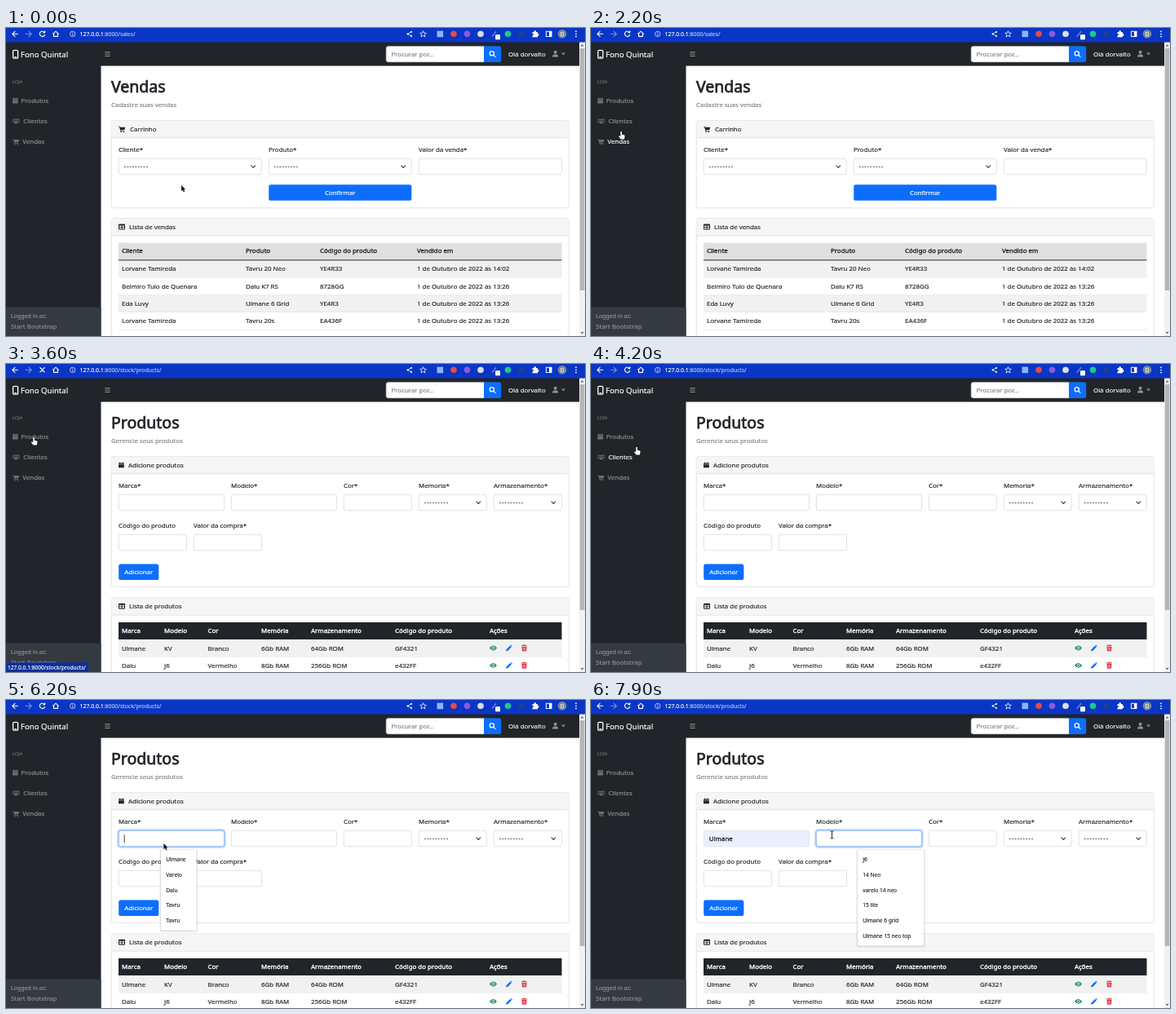
Recreate the animation shown at these times as an HTML page. Size 710 by 378 pixels, loop 8000 ms.

```html
<!DOCTYPE html>
<html lang="pt-BR">
<head>
<meta charset="utf-8">
<title>Vendas</title>
<style>
html, body { margin: 0; width: 100%; height: 100%; overflow: hidden; background: #fff; }
svg { display: block; width: 710px; height: 378px; font: 7.9px "Noto Sans", "Open Sans", sans-serif; color: #212529; fill: currentColor; }
/* The thin stroke gives the text a medium weight */
text { white-space: pre; stroke: currentColor; stroke-width: .16; }
.m { stroke-width: .34; }
.h1 { font-size: 19.5px; stroke-width: .75; }
.mute { color: #7b8288; }
.w { color: #fff; }
.line { fill: none; stroke: #fff; stroke-width: 1.1; stroke-linecap: round; stroke-linejoin: round; }
.link { color: #909294; }
.link.on { color: #fff; }
.dim { color: #6c6f72; }
.pop { font-size: 6.6px; }
</style>
</head>
<body>
<svg id="stage" viewBox="0 0 710 378" xmlns="http://www.w3.org/2000/svg"></svg>
<script>
const LOOP = 8000, TICK = 100, BLUE = '#0d6efd', DARK = '#212529', BAR = '#0a36c6';

const text = (x, y, s, attr = '') => `<text x="${x}" y="${y}" ${attr}>${s}</text>`;
const rect = (x, y, w, h, fill, attr = '') =>
  `<rect x="${x}" y="${y}" width="${w}" height="${h}" fill="${fill}" ${attr}/>`;
const dot = (x, y, r, fill, attr = '') => `<circle cx="${x}" cy="${y}" r="${r}" fill="${fill}" ${attr}/>`;
const path = (d, attr = '') => `<path d="${d}" ${attr}/>`;
const at = (x, y, body, attr = '') => `<g transform="translate(${x} ${y})" ${attr}>${body}</g>`;
const group = (id, body) => `<g id="${id}">${body}</g>`;

// Icons, drawn from their top left corner
const icon = {
  cart: path('M0 .3H1.6L2 1.4H8.2L7.3 4.6H2.8L3 5.4H7V6.1H2.3L1.1 1H0Z') + '<circle cx="3.1" cy="7" r=".8"/><circle cx="6.6" cy="7" r=".8"/>',
  box: path('M1.2 0H2.2V1H4.6V0H5.6V1H6.8V2.3H0V1H1.2ZM0 2.8H6.8V6.8H0Z'),
  users: '<circle cx="4.5" cy="2.2" r="1.3"/><circle cx="1.6" cy="1.6" r="1"/><circle cx="7.4" cy="1.6" r="1"/>' +
    path('M2.2 6.6Q2.2 4 4.5 4T6.8 6.6ZM0 4.9Q0 3 1.7 3L2.6 3.5 1.8 4.9ZM9 4.9Q9 3 7.3 3L6.4 3.5 7.2 4.9Z'),
  table: path('M1 0H7Q8 0 8 1V6Q8 7 7 7H1Q0 7 0 6V1Q0 0 1 0ZM1 2V3.6H3.5V2ZM4.5 2V3.6H7V2ZM1 4.5V6H3.5V4.5ZM4.5 4.5V6H7V4.5Z', 'fill-rule="evenodd"'),
  user: '<circle cx="3.6" cy="2" r="2"/>' + path('M0 7.6Q0 4.6 2.5 4.6H4.7Q7.2 4.6 7.2 7.6Z'),
  eye: path('M0 3Q4.5 -3 9 3Q4.5 9 0 3Z') + dot(4.5, 3, 2, '#fff') + '<circle cx="4.5" cy="3" r="1.2"/>',
  pencil: path('M0 8L.6 5.7 5.2 1.1 6.9 2.8 2.3 7.4ZM5.7 .6L6.3 0 8 1.7 7.4 2.3Z'),
  trash: path('M0 .7H2L2.5 0H4.5L5 .7H7V1.6H0ZM.5 2.2H6.5L6.1 8H.9Z') + path('M2.3 3.3V7M3.5 3.3V7M4.7 3.3V7', 'stroke="#fff" stroke-width=".4"'),
};

function field(x, w, y = 160, select = false) {
  let s = rect(x + .25, y + .25, w - .5, 19.5, '#fff', 'rx="2.6" stroke="#ced4da" stroke-width=".7"');
  if (select) s += text(x + 6.5, y + 12.4, '---------', 'letter-spacing=".85"') +
    path(`M${x + w - 13} ${y + 8.7}l2.7 2.7 2.7 -2.7`, 'fill="none" stroke="#343a40" stroke-width="1.1"');
  return s;
}
const button = (x, y, w, label) => rect(x + .2, y + .3, w - .4, 19.5, BLUE, 'rx="2.6"') +
  text(x + w / 2, y + 12.7, label, 'class="w" text-anchor="middle"');

function card(y, h, pic, tx, title) {
  return rect(129.3, y, 560.8, h, '#fff', 'rx="2.8" stroke="#d9d9d9" stroke-width=".7"') +
    path(`M129.6 ${y + 21.3}V${y + 3}q0 -2.6 2.6 -2.6H687.2q2.6 0 2.6 2.6V${y + 21.3}Z`, 'fill="#f6f6f6"') +
    rect(129.3, y + 21, 560.8, .7, '#d9d9d9') +
    at(138, y + 7, icon[pic]) + text(tx, y + 13.4, title);
}
const heading = (title, sub) => text(129, 78.5, title, 'class="h1"') + text(129, 97, sub, 'class="mute"');
const cells = (xs, y, items, attr) => items.map((s, i) => text(xs[i], y, s, attr)).join('');

function salesPage() {
  const xs = [142, 294, 385, 504], day = '1 de Outubro de 2022 às ';
  const rows = [
    ['Lorvane Tamireda', 'Tavru 20 Neo', 'YE4R33', day + '14:02'],
    ['Belmiro Tulo de Quenara', 'Dalu K7 RS', '8728GG', day + '13:26'],
    ['Eda Luvy', 'Ulmane 6 Grid', 'YE4R3', day + '13:26'],
    ['Lorvane Tamireda', 'Tavru 20s', 'EA436F', day + '13:26'],
  ];
  return heading('Vendas', 'Cadastre suas vendas') +
    card(113.4, 107.4, 'cart', 152, 'Carrinho') +
    cells([138, 322, 506], 152.2, ['Cliente*', 'Produto*', 'Valor da venda*']) +
    field(138, 175.5, 160, true) + field(322, 175.5, 160, true) + field(506, 175.5) +
    button(322, 192, 175.5, 'Confirmar') +
    card(233.6, 170, 'table', 151, 'Lista de vendas') +
    rect(138, 263.7, 543.5, 20.8, '#e0e0e0') +
    cells(xs, 276.4, ['Cliente', 'Produto', 'Código do produto', 'Vendido em'], 'class="m"') +
    rows.map((r, i) => {
      const y = 285 + i * 21.3;
      return rect(138, y, 543.5, 21.3, i % 2 ? '#fff' : '#f1f1f1') +
        rect(138, y + 20.9, 543.5, .6, '#d9dcdf') + cells(xs, y + 13.4, r);
    }).join('') + rect(138, 284.4, 543.5, 1, DARK);
}

function productsPage() {
  const xs = [142, 194, 247.5, 313, 374, 477, 593];
  const rows = [
    ['Ulmane', 'KV', 'Branco', '6Gb RAM', '64Gb ROM', 'GF4321'],
    ['Dalu', 'J6', 'Vermelho', '8Gb RAM', '256Gb ROM', 'e432FF'],
  ];
  return heading('Produtos', 'Gerencie seus produtos') +
    card(113.4, 160, 'box', 150, 'Adicione produtos') +
    cells([138, 276, 414, 506, 598], 152.2, ['Marca*', 'Modelo*', 'Cor*', 'Memoria*', 'Armazenamento*']) +
    field(138, 129.8) + field(276, 129.8) + field(414, 83.6) + field(506, 83.6, 160, true) + field(598, 83.6, 160, true) +
    cells([138, 230], 201.2, ['Código do produto', 'Valor da compra*']) +
    field(138, 83.8, 209) + field(230, 83.8, 209) +
    button(138, 245.3, 49.5, 'Adicionar') +
    card(286.8, 120, 'table', 151, 'Lista de produtos') +
    rect(138, 317, 543.5, 21.2, DARK) +
    cells(xs, 330, ['Marca', 'Modelo', 'Cor', 'Memória', 'Armazenamento', 'Código do produto', 'Ações'], 'class="w m"') +
    rows.map((r, i) => {
      const y = 338.2 + i * 21.3;
      return rect(138, y, 543.5, 21.3, i % 2 ? '#fff' : '#f1f1f1') + rect(138, y + 20.9, 543.5, .6, '#d9dcdf') +
        cells(xs, y + 13.4, r) + at(593, y + 7.4, icon.eye, 'fill="#198754"') +
        at(613, y + 6.3, icon.pencil, `fill="${BLUE}"`) + at(632, y + 6.3, icon.trash, 'fill="#dc3545"');
    }).join('');
}

function browserBar() {
  const tools = [
    [549, '#e5484d'], [565.5, '#8a5be0'], [582, '#d9dde3'], [615.5, '#22c98a'], [632, '#1c3f9e'],
  ];
  return rect(0, 0, 710, 17.5, BAR) +
    path('M14.5 7.3H8M11 4.2L7.8 7.3 11 10.4', 'class="line"') +
    path('M24.5 7.3H31M28 4.2L31.2 7.3 28 10.4', 'class="line" opacity=".45"') +
    group('reload', path('M47.2 5.3A3.2 3.2 0 1 0 47.6 8.3M47.7 3.7V5.7H45.6', 'class="line"')) +
    group('stop', path('M41.8 4.5L47.2 9.9M47.2 4.5L41.8 9.9', 'class="line"')) +
    path('M57.6 7.2L61 4.1 64.4 7.2M58.6 6.8V10.4H63.4V6.8', 'class="line"') +
    dot(81.7, 7.3, 3.2, 'none', 'stroke="#dbe5ff" stroke-width=".8"') + rect(81.3, 6.8, .9, 2.4, '#dbe5ff') + rect(81.3, 5.3, .9, .9, '#dbe5ff') +
    '<text x="90.5" y="10" font-size="6.9" class="w">127.0.0.1<tspan color="#b4c6f5">:8000<tspan id="path"></tspan></tspan></text>' +
    path('M492.6 7.3L497 4.8M492.6 7.3L497 9.8', 'stroke="#fff" stroke-width=".8"') +
    dot(492.6, 7.3, 1.1, '#fff') + dot(497, 4.8, 1.1, '#fff') + dot(497, 9.8, 1.1, '#fff') +
    path('M511.5 3.6l1.1 2.5 2.7 .2-2.1 1.8.7 2.7-2.4-1.5-2.4 1.5.7-2.7-2.1-1.8 2.7-.2Z', 'fill="none" stroke="#fff" stroke-width=".8"') +
    rect(528.5, 3.5, 7.6, 7.6, '#8db4f5') + tools.map(([x, c]) => dot(x, 7.3, 3.8, c)).join('') +
    path('M596 10.5L601 4', 'stroke="#5b7fe0" stroke-width="1.6"') + rect(600, 8, 6, 6.2, '#f2f5ff', 'rx="1"') +
    path('M645.5 5H647.5Q647.2 3 648.7 3T650 5H652V7Q653.5 6.8 653.5 8.2T652 9.4V11.2H645.5V9.2Q647 9 647 8T645.5 7Z', 'class="w"') +
    rect(662.4, 4.2, 6.6, 6.2, 'none', 'stroke="#fff"') + rect(666, 4.2, 3, 6.2, '#fff') +
    dot(682, 7.3, 5.3, '#7d8b93') + text(682, 9.7, 'D', 'class="w" font-size="6.4" text-anchor="middle"') +
    [4.2, 7.3, 10.4].map(y => dot(699, y, .9, '#fff')).join('');
}

const LINKS = [['Produtos', 'box', 18.5, 92], ['Clientes', 'users', 21.3, 117], ['Vendas', 'cart', 20.3, 142]];

function frame() {
  return rect(0, 17, 703, 29.5, DARK) + rect(0, 46, 116.5, 332, DARK) + rect(0, 342.8, 116.5, 36, '#343a40') +
    rect(8.6, 27.4, 6, 9.8, 'none', 'rx="1.2" stroke="#fff" stroke-width="1.3"') + rect(10.3, 35, 2.6, 1.1, '#fff') +
    text(18, 35.6, 'Fono Quintal', 'class="w" font-size="9.6"') +
    path('M121.3 29.6H127.7M121.3 32H127.7M121.3 34.4H127.7', 'stroke="#8e9194" stroke-width="1"') +
    rect(466.2, 22.4, 122, 19.3, '#fff', 'rx="2.6" stroke="#ced4da" stroke-width=".6"') +
    text(472.5, 34.8, 'Procurar por...', 'class="mute"') +
    path('M586 22.3H604.6Q607.2 22.3 607.2 25V39.3Q607.2 42 604.6 42H586Z', `fill="${BLUE}"`) +
    dot(595.8, 31.2, 2.6, 'none', 'stroke="#fff" stroke-width="1.3"') + path('M597.8 33.2L600 35.4', 'class="line"') +
    text(616, 34.8, 'Olá dorvalto', 'color="#f2f2f3"') + at(670, 27.8, icon.user, 'fill="#909294"') +
    path('M681 30.6H686L683.5 33.2Z', 'fill="#909294"') +
    text(8, 68, 'LOJA', 'class="dim" font-size="5.6"') +
    LINKS.map(([name, pic, x, y], i) => at(8, y - 6.4, icon[pic], 'class="dim"') + text(x, y, name, `class="link" id="link${i}"`)).join('') +
    text(6, 356.3, 'Logged in as:', 'class="link" font-size="7"') + text(6, 368.6, 'Start Bootstrap', 'class="link"') +
    rect(703, 17.2, 7, 361, '#f1f1f1') + path('M704.6 22.4H708.6L706.6 20ZM704.6 373H708.6L706.6 375.4Z', 'fill="#6a6a6a"') +
    '<rect id="thumb" x="703.8" y="25" width="5.6" fill="#b5b5b5"/>';
}

function popup(id, x, w, items) {
  const h = items.length * 18.7 + 5.2;
  return group(id, [1.6, .8].map(d => rect(x - d, 184 - d / 2, w + 2 * d, h + 2 * d, '#000', 'rx="2" opacity=".07"')).join('') +
    rect(x, 184, w, h, '#fff', 'rx="1.5"') +
    rect(x, 186.6, w, 18.7, '#e8e8e8', 'class="hover" visibility="hidden"') +
    items.map((s, i) => text(x + 6.3, 198.2 + i * 18.7, s, 'class="pop"')).join(''));
}
const focusRing = (id, x) => group(id,
  rect(x - .8, 159.2, 131.4, 21.6, 'none', 'rx="3.4" stroke="#0d6efd" stroke-opacity=".27" stroke-width="2.1"') +
  rect(x + .25, 160.25, 129.3, 19.5, 'none', 'rx="2.6" stroke="#86b7fe" stroke-width=".8"'));
const caret = (id, x) => rect(x, 165.4, .8, 10, '#111', `id="${id}"`);

const outline = 'paint-order="stroke" stroke-linejoin="round" stroke-width=".9"';
const pointers = {
  arrow: path('M0 0V7.3L1.7 5.8 2.9 8.5 4.2 7.9 3 5.3H5.2Z', `fill="#111" stroke="#fff" ${outline}`),
  hand: path('M-.8 .2Q0 -.6 .8 .2V3.6L4 4.4Q4.6 4.8 4.5 5.8L3.8 9.6H-.6L-3 6.2Q-3 5 -1.8 5.4L-.8 6.2Z', `fill="#fff" stroke="#111" ${outline}`),
  beam: path('M-1.9 -4.4H-.4L0 -4 .4 -4.4H1.9M0 -4V4M-1.9 4.4H-.4L0 4 .4 4.4H1.9', 'fill="none" stroke="#111" stroke-width=".9"'),
};

document.getElementById('stage').innerHTML =
  rect(0, 0, 710, 378, '#fff') + frame() + browserBar() +
  group('sales', salesPage()) +
  group('products', productsPage() +
    group('filled', rect(138.6, 160.6, 128.6, 18.8, '#e8f0fe', 'rx="2.3"') + text(144.8, 172.5, 'Ulmane', 'class="m"')) +
    focusRing('ring1', 138) + focusRing('ring2', 276) +
    caret('caret1', 144.7) + caret('caret2', 173.6) + caret('caret3', 282.6) +
    popup('pop1', 190, 43.5, ['Ulmane', 'Varelo', 'Dalu', 'Tavru', 'Tavru']) +
    popup('pop2', 327, 81.2, ['J6', '14 Neo', 'varelo 14 neo', '15 lite', 'Ulmane 6 grid', 'Ulmane 15 neo top'])) +
  group('status', rect(0, 366.4, 101, 12, '#0a2f9e') + text(2, 374.7, '127.0.0.1:8000/stock/products/', 'class="w" font-size="6.6"')) +
  group('cursor', Object.entries(pointers).map(([k, s]) => group(k, s)).join(''));

// Pointer track: time, x, y
const TRACK = [
  [0, 215, 193], [900, 215, 193], [1200, 196, 187], [1300, 196, 187], [2000, 42, 141], [2200, 37, 127],
  [2700, 34, 99], [2800, 34, 99], [3100, 34, 90], [4100, 34, 90], [4200, 56, 102], [4300, 56, 102],
  [4600, 186.5, 166], [6100, 186.5, 166], [6400, 207, 196], [6800, 207, 196], [7200, 297, 160.3],
  [7300, 297, 160.3], [7500, 295.5, 165.5], [LOOP, 295.5, 165.5],
];
function pointer(t) {
  const i = TRACK.findIndex(p => p[0] > t), [t0, x0, y0] = TRACK[i - 1], [t1, x1, y1] = TRACK[i];
  const k = (t - t0) / (t1 - t0);
  return [x0 + (x1 - x0) * k, y0 + (y1 - y0) * k];
}

const el = id => document.getElementById(id);
const show = (id, on) => { el(id).style.display = on ? '' : 'none'; };
const fade = (id, v) => { el(id).style.opacity = Math.max(0, Math.min(1, v)); };

function render(t) {
  const within = (a, b) => t >= a && t < b;
  const [x, y] = pointer(t), onProducts = t >= 3600, loading = within(3000, 3800);
  const link = x < 116 && y >= 77 && y < 151 ? Math.floor((y - 77) / 24.9) : -1;
  const kind = link >= 0 ? 'hand' : within(4600, 6200) || t >= 7200 ? 'beam' : 'arrow';

  el('cursor').setAttribute('transform', `translate(${x} ${y})`);
  for (const k in pointers) show(k, k === kind);
  LINKS.forEach((_, i) => el('link' + i).classList.toggle('on', i === link && !within(3600, 3800)));

  show('sales', !onProducts);
  show('products', onProducts);
  show('reload', !loading);
  show('stop', loading);
  show('status', within(2700, 3800));
  el('path').textContent = t < 3400 ? '/sales/' : '/stock/products/';
  el('thumb').setAttribute('height', onProducts ? 277 : 297);

  fade('ring1', t < 7400 ? (t - 4850) / 150 : (7550 - t) / 200);
  fade('ring2', (t - 7350) / 150);
  show('pop1', within(4900, 6400));
  document.querySelector('#pop1 .hover').style.visibility = within(6300, 6400) ? 'visible' : 'hidden';
  show('pop2', t >= 7500);
  show('filled', t >= 6600);
  show('caret1', within(4900, 5400) || within(6000, 6600));
  show('caret2', within(6600, 7400));
  show('caret3', within(7400, 7900));
}

const start = performance.now();
let last = -1;
function loop() {
  const t = Math.floor((performance.now() - start) % LOOP / TICK) * TICK;
  if (t !== last) render(last = t);
  requestAnimationFrame(loop);
}
loop();
</script>
</body>
</html>
```
